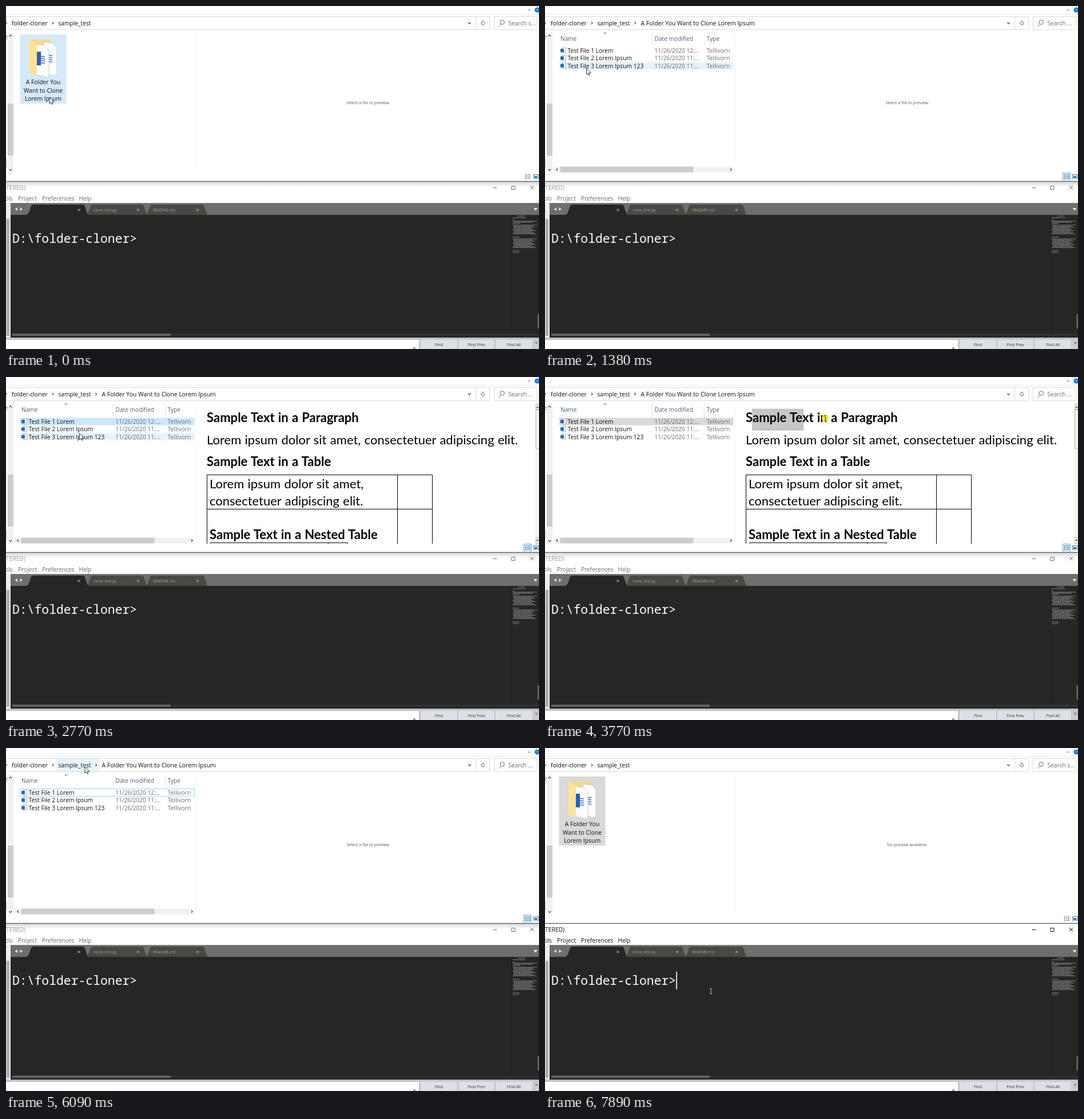
Recreate the animation shown at these times as an HTML page. Size 932 by 601 pixels, loop 7990 ms.

```html
<!DOCTYPE html>
<html lang="en">
<head>
<meta charset="utf-8">
<title>Folder cloner demo</title>
<style>
  html, body { margin: 0; width: 100%; height: 100%; overflow: hidden; background: #fff; }
  svg { display: block; width: 932px; height: 601px; }
  text { font-family: "Open Sans", "Noto Sans", sans-serif; }
  .doc text { font-family: Lato, "Open Sans", sans-serif; font-size: 22px; word-spacing: .033em; }
  .doc .head { font-weight: 700; font-size: 22.05px; }
  .prompt { font-family: "Noto Sans Mono", "DejaVu Sans Mono", monospace; font-size: 21.4px; font-weight: 500; }
</style>
</head>
<body>
<svg id="stage" viewBox="0 0 932 601"></svg>
<script>
const LOOP = 7990;

const rect = (x, y, w, h, fill, more = '') =>
  `<rect x="${x}" y="${y}" width="${w}" height="${h}" fill="${fill}" ${more}/>`;
const line = (d, color, width = 1, more = '') =>
  `<path d="${d}" fill="none" stroke="${color}" stroke-width="${width}" ${more}/>`;
const shape = (d, fill, more = '') => `<path d="${d}" fill="${fill}" ${more}/>`;
const text = (x, y, str, size, fill, more = '') =>
  `<text x="${x}" y="${y}" font-size="${size}" fill="${fill}" ${more}>${str}</text>`;
const mid = 'text-anchor="middle"';
const chevron = (x, y, dx, dy, color = '#444') =>
  line(dx ? `M${x - dx} ${y - 2.2}L${x + dx} ${y}L${x - dx} ${y + 2.2}`
          : `M${x - 2.4} ${y - dy}L${x} ${y + dy}L${x + 2.4} ${y - dy}`, color, 1.1);
const cross = (x, y, r, color, w = 1) =>
  line(`M${x - r} ${y - r}l${2 * r} ${2 * r}M${x + r} ${y - r}l${-2 * r} ${2 * r}`, color, w);

function addressBar() {
  return rect(0, 14, 932, 1, '#e6e6e6') +
    line('M0 18.5H845.5V41.5H0M821.5 19V41', '#d9d9d9') +
    rect(853.5, 18.5, 75, 23, '#fff', 'stroke="#d9d9d9"') +
    rect(88, 19, 77, 22, '#e8f4fd', 'id="crumbHover"') +
    chevron(0, 30, 1.2) + chevron(82, 30, 1.2) +
    text(10, 33.5, 'folder-cloner', 10.45, '#111') +
    text(91.5, 33.5, 'sample_test', 10.2, '#111') +
    `<g class="files">${chevron(157.5, 30, 1.2)}` +
    text(167.5, 33.5, 'A Folder You Want to Clone Lorem Ipsum', 10.45, '#111') + '</g>' +
    chevron(810.5, 30, 0, 1.4) +
    line('M836.3 28.4A3 3 0 1 1 833.5 27.2M833.2 25.6l2 1.6-2 1.8', '#555', 1) +
    line('M865 32.5L861.5 36M871.5 28.5a3.8 3.8 0 1 1-7.6 0a3.8 3.8 0 1 1 7.6 0', '#666', 1) +
    text(878.5, 34, '', 10.2, '#6d6d6d', 'id="search"') +
    chevron(915, 7, 0, 1.2, '#999') +
    '<circle cx="929" cy="7" r="4.6" fill="#1c75c8"/>' + text(929, 10, '?', 8, '#fff', mid);
}

function sideBar() {
  return text(-2.5, 58, 'e', 10, '#a05a2c') + rect(3, 47, 10, 245, '#f1f1f1') +
    rect(3, 171, 10, 91, '#cdcdcd') + rect(0, 268, 2, 16, '#d9d9d9') +
    chevron(8, 52, 0, -1.4) + chevron(8, 287, 0, 1.4) + rect(331, 48, 1, 243, '#f6f6f6');
}

function folderView() {
  const label = ['A Folder You', 'Want to Clone', 'Lorem Ipsum']
    .map((s, i) => text(65, 137 + i * 14.5, s, 10.4, '#111', mid)).join('');
  const page = (x, y, w, h) => shape(
    `M${x} ${y}l${w - 7} 2l7 8v${h - 6}l${-w} -5z`, '#fcfcfc', 'stroke="#b9bdc2" stroke-width=".7"');
  const rules = (x, y) =>
    line(`M${x} ${y}l7 1.2m-7 2.6l7 1.2m-7 2.6l7 1.2m-7 2.6l7 1.2`, '#3273c4', 1.5);
  return '<g class="folder">' + rect(24.5, 50, 81, 121, '#d5e9f9', 'id="tint"') +
    shape('M41 59H79V118L41 117Z', '#f8d984') + page(66, 63, 23, 56) + rules(74, 86) +
    page(51, 67, 24, 54) + rules(61, 88) + rect(54, 80, 7, 24, '#2b5fad') +
    shape('M41 59L52 65Q54 66 54 69V122L41 117Z', '#fde29b') + label + '</g>';
}

function fileRow(name, i) {
  const y = 82 + i * 13.3;
  return rect(24.5, y - 10.5, 305, 13, 'none', `id="row${i}"`) +
    rect(30.5, y - 9, 6, 9.5, '#fff', 'stroke="#8a9bb0" stroke-width=".8"') +
    rect(27, y - 7, 6, 6, '#2b66b8') +
    text(39.5, y, name, 10.25, '#111') +
    text(191.5, y, `11/26/2020 1${i ? 1 : 2}:...`, 10.05, '#6d6d6d') +
    text(282.5, y, 'Tellivorn', 10.4, '#6d6d6d');
}

function filesView() {
  const heads = [[27, 'Name'], [191.5, 'Date modified'], [282.5, 'Type']]
    .map(([x, s]) => text(x, 61, s, 10.2, '#4c607a')).join('');
  const names = ['Test File 1 Lorem', 'Test File 2 Lorem Ipsum', 'Test File 3 Lorem Ipsum 123'];
  return '<g class="files">' + heads + line('M187.5 47V69M278.5 47V69', '#e3e3e3') +
    chevron(105, 47.5, 0, -1.1, '#777') + names.map(fileRow).join('') +
    rect(15, 281.5, 314, 10, '#f1f1f1') + rect(26.5, 281.5, 233, 10, '#cdcdcd') +
    chevron(21, 286.5, -1.3) + chevron(325, 286.5, 1.3) +
    rect(905.5, 292.5, 13, 14, '#cfe9fa', 'stroke="#6fb9e6"') + '</g>';
}

function previewPane() {
  const body = (x, y, s) => text(x, y, s, '', '#000');
  const head = (x, y, s) => text(x, y, s, '', '#000', 'class="head"');
  return text(633.5, 172, '', 7.2, '#555', `id="message" ${mid}`) +
    '<g id="doc" class="doc">' + rect(0, 0, 0, 38.5, '#c6c6c6', 'id="selection"') +
    head(351, 79, 'Sample Text in a Paragraph') +
    body(351, 117.5, 'Lorem ipsum dolor sit amet, consectetuer adipiscing elit.') +
    head(351, 156, 'Sample Text in a Table') +
    body(356, 195, 'Lorem ipsum dolor sit amet,') + body(356, 224.5, 'consectetuer adipiscing elit.') +
    head(356, 284, 'Sample Text in a Nested Table') +
    line('M351.5 292V171.5H745.5V292M684.5 171.5V292M351.5 231.5H745.5M357.5 292V290.5H597.5V292M563.5 290.5V292', '#000') +
    rect(926, 47, 6, 245, '#f3f3f3') +
    line('M932 47.5H926.5V56.5H932M932 57.5H926.5V125.5H932M932 281.5H926.5V291.5H932', '#b5b5b5') +
    shape('M927.5 54h4l-2-3zM927.5 285h4l-2 3z', '#444') + '</g>';
}

function statusIcons() {
  const dots = [296, 299, 302].map(y => `M907.5 ${y}H910M911.5 ${y}H913.5M914.5 ${y}H917`).join('');
  return line(dots, '#777', 1.4) + rect(922.5, 295.5, 9, 6.5, '#dceefa', 'stroke="#6d7f90"') +
    rect(924, 298, 5, 3, '#2f6fa8');
}

function minimap() {
  const rows = [[368, 895, 907], [371, 886, 909], [375, 886, 889], [381, 886, 898],
    [405, 886, 898], [429, 886, 898], [432, 886, 897]];
  for (const [top, count] of [[377, 2], [384, 9], [408, 9]])
    for (let i = 0; i < count; i++)
      rows.push([top + i * 1.9, i % 4 ? 887.5 : 886, 928 - (i * 7 % 11)]);
  return rows.map(([y, a, b], i) =>
    line(`M${a} ${y}H${b}`, '#979797', 1, `stroke-dasharray="${2 + i % 3} .7 3 .5"`)).join('');
}

function tabBar() {
  const tab = (x, w, fill) =>
    shape(`M${x - 2} 366Q${x + 2} 365 ${x + 4} 359L${x + 7} 350Q${x + 8} 348 ${x + 11} 348` +
      `H${x + w - 9}Q${x + w - 6} 348 ${x + w - 5} 351L${x + w} 366Z`, fill);
  return rect(8, 345, 924, 21.5, '#6e6e6e') + rect(8, 345, 924, 1, '#858585') +
    tab(245, 107, '#484942') + tab(141, 105, '#484942') + tab(37, 106, '#262626') +
    shape('M20 353v6l-4.5-3zM24.5 353v6l4.5-3z', '#e2e2e2') + shape('M922.5 354h7l-3.5 4.5z', '#eee') +
    text(153, 359.5, 'clone_test.py', 6.7, '#a2a29c') + text(257, 359.5, 'README.md', 6.7, '#a2a29c') +
    cross(127.5, 357.3, 2, '#ddd') + cross(231, 357.3, 2, '#bbb') + cross(335, 357.3, 2, '#bbb');
}

function editor() {
  const menu = [[-2, 'ols'], [21, 'Project'], [63, 'Preferences'], [127.5, 'Help']]
    .map(([x, s]) => text(x, 340.5, s, 10.2, 'currentColor')).join('');
  const buttons = [[725, 64, 'Find'], [791, 63, 'Find Prev'], [856, 64, 'Find All']]
    .map(([x, w, s]) => rect(x, 584.5, w, 17, '#dde1e5') + text(x + w / 2, 596, s, 7.1, '#333', mid)).join('');
  return '<linearGradient id="shade" x2="0" y2="1"><stop stop-color="#d6d6d6"/><stop offset="1" stop-color="#fff"/></linearGradient>' +
    rect(0, 308, 932, 9, 'url(#shade)', 'id="shadow"') +
    rect(0, 306, 932, 1, '#d8d8d8') + rect(0, 307, 932, 1, '#555') +
    '<g id="title">' + text(0, 321.5, 'TERED)', 10.3, 'currentColor', 'id="caption"') +
    line('M851.5 318.5H858.5M884 315.5h6v6h-6z', 'currentColor') + cross(920, 318, 3.2, 'currentColor') + menu + '</g>' +
    rect(0, 345, 8, 236, '#ededed') + rect(1, 373, 5, 205, '#ababab') + tabBar() +
    rect(8, 366, 924, 215, '#262626') + rect(884, 366, 1, 208, '#202020') + minimap() +
    rect(929.5, 540, 2.5, 25, '#6a6a6a') + rect(11, 574, 921, 4, '#303030') + rect(11, 574, 277, 4, '#626262') +
    text(11, 415, 'D:\\folder-cloner&gt;', '', '#fff', 'class="prompt"') +
    rect(229.3, 392, 1.7, 31, '#f8f8f0', 'id="caret"') +
    rect(0, 581, 932, 20, '#bfc4c9') + rect(0, 585, 722, 16, '#fff') + buttons +
    rect(921, 584.5, 11, 17, '#c9cdd1') + cross(927.5, 590, 2, '#555') + shape('M711 598.5h6l-3 3z', '#777');
}

function pointer() {
  return '<g id="pointer"><circle id="press" r="6.3" fill="#f4ec2a" opacity=".85"/>' +
    shape('M0 0V11L2.6 8.7L4.4 12.4L6 11.6L4.3 8H7.8Z', '#fff', 'stroke="#222" stroke-width=".9" id="arrow"') +
    line('M-2 -4.7H-.6L0 -4.2L.6 -4.7H2M0 -4.2V4.2M-2 4.7H-.6L0 4.2L.6 4.7H2', 'currentColor', 1, 'id="beam"') + '</g>';
}

stage.innerHTML = rect(0, 0, 932, 601, '#fff') + addressBar() + sideBar() + folderView() +
  filesView() + previewPane() + statusIcons() + editor() + pointer();

const pick = 'Select a file to preview.', none = 'No preview available.';
const STEPS = [
  [0, { view: 'folder', tint: '#d5e9f9', message: pick, row: '' }],
  [560, { tint: '#cce8ff', message: none }],
  [1030, { view: 'files', message: pick }],
  [1900, { row: 'selected', message: '' }],
  [2400, { doc: true }],
  [3430, { row: 'unfocused' }],
  [5900, { doc: false, message: pick, row: 'focus' }],
  [6310, { view: 'folder', message: none, row: '' }],
  [7600, { active: true, tint: '#d9d9d9' }],
];
const PRESSES = [[560, 650], [940, 1020], [1900, 1990], [3430, 3990], [4680, 5170],
  [5880, 5960], [6250, 6320], [7560, 7640]];
const PATH = [[0, 76, 160], [100, 76, 160], [300, 80, 200], [480, 82, 201], [640, 78, 165],
  [840, 77, 160], [1030, 77, 160], [1380, 72.5, 109], [1500, 73, 109], [1720, 82, 88],
  [1900, 82, 83], [2600, 82, 83], [2850, 150, 106], [3100, 300, 112], [3250, 425, 113],
  [3430, 362, 72], [3770, 490, 72], [3970, 495, 72], [4100, 495, 72], [4500, 380, 112],
  [4680, 354, 114], [4970, 475, 116], [5150, 494, 116], [5350, 470, 155], [5690, 440, 120],
  [5800, 300, 140], [5880, 200, 150], [6000, 150, 70], [6090, 138, 33], [6590, 138, 33],
  [7290, 188, 420], [7390, 195, 421], [7700, 290, 426]];
const DRAGS = [
  { y: 55.5, until: 4680, edge: [[3470, 362], [3770, 452], [3920, 495]] },
  { y: 94, until: 5400, edge: [[4700, 354], [4970, 444], [5150, 493]] },
];

function along(points, t) {
  const next = points.findIndex(p => p[0] > t);
  if (next < 0) return points.at(-1).slice(1);
  if (next === 0) return points[0].slice(1);
  const a = points[next - 1], b = points[next], k = (t - a[0]) / (b[0] - a[0]);
  return a.slice(1).map((v, i) => v + (b[i + 1] - v) * k);
}

const $ = id => document.getElementById(id);
const show = (el, on) => { el.style.display = on ? '' : 'none'; };
const set = (id, attrs) => { for (const k in attrs) $(id).setAttribute(k, attrs[k]); };

function paintRows(state, hovered) {
  for (let i = 0; i < 3; i++) {
    let fill = hovered === i ? '#e5f3ff' : 'none', stroke = 'none';
    if (i === 0 && state.row === 'selected') {
      fill = '#cce8ff';
      if (hovered === 0) stroke = '#99d1ff';
    }
    if (i === 0 && state.row === 'unfocused') fill = '#d9d9d9';
    if (i === 0 && state.row === 'focus') stroke = '#99d1ff';
    set('row' + i, { fill, stroke });
  }
}

function draw(t) {
  const state = Object.assign({}, ...STEPS.filter(s => s[0] <= t).map(s => s[1]));
  const files = state.view === 'files';
  const [x, y] = along(PATH, t);

  stage.querySelectorAll('.files').forEach(el => show(el, files));
  show(stage.querySelector('.folder'), !files);
  $('search').textContent = files ? 'Search ...' : 'Search s...';
  $('message').textContent = state.message;
  set('tint', { fill: state.tint });
  show($('doc'), state.doc);
  paintRows(state, x < 330 ? Math.floor((y - 71.5) / 13.3) : -1);

  show($('crumbHover'), y > 18 && y < 42 && x > 88 && x < 165);
  set('crumbHover', { width: files ? 77 : 63 });
  $('title').style.color = state.active ? '#111' : '#6a6a6a';
  $('caption').style.color = state.active ? '#111' : '#999';
  show($('shadow'), !state.active);
  show($('caret'), state.active);

  const drag = DRAGS.find(d => t >= d.edge[0][0] && t < d.until);
  show($('selection'), drag);
  if (drag) {
    const start = drag.edge[0][1];
    set('selection', { x: start, y: drag.y, width: along(drag.edge, t)[0] - start });
  }

  const beam = y > 366 || (state.doc && x > 335);
  show($('beam'), beam);
  show($('arrow'), !beam);
  show($('press'), PRESSES.some(([a, b]) => t >= a && t < b));
  $('beam').style.color = y > 366 ? '#c8c8c8' : '#5f5f18';
  set('pointer', { transform: `translate(${x} ${y})` });
}

const begin = performance.now();
function tick() {
  draw((performance.now() - begin) % LOOP);
  requestAnimationFrame(tick);
}
tick();
</script>
</body>
</html>
```
